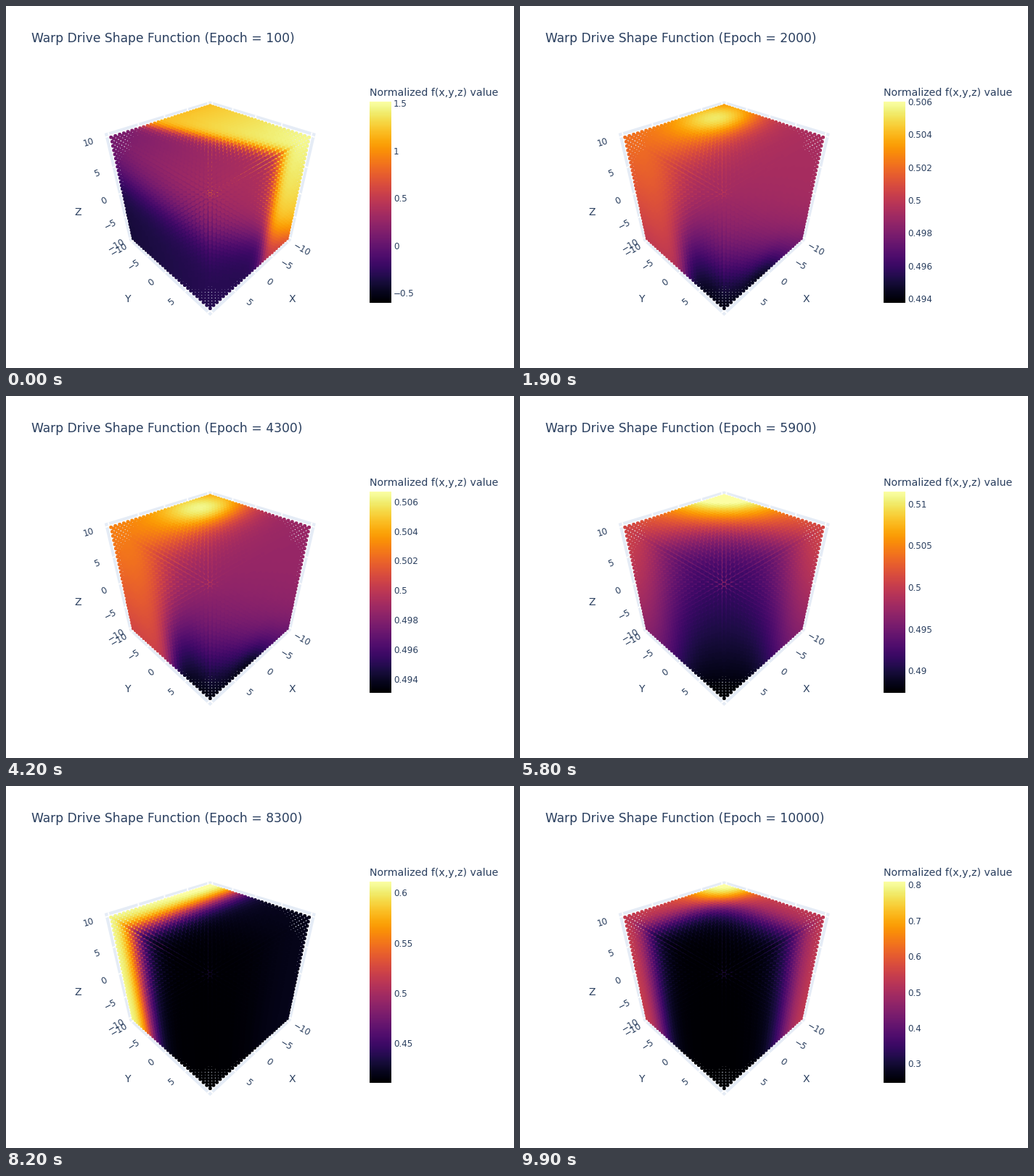
These frames come from a looping animation (700x500 px, 10000 ms). A matplotlib script:

```python
import matplotlib.pyplot as plt
import numpy as np
from matplotlib import colormaps
from matplotlib.animation import FuncAnimation

W, H, DPI = 700, 500, 100
FRAMES = 100
PT = 72 / DPI
INK, PANE = "#2a3f5f", "#e5ecf6"
plt.rcParams["font.family"] = "DejaVu Sans"

# Perspective camera on the (1, 1, 1) diagonal
CX, CY, FOCAL = 281.3, 260.0, 386.0
DIST = 1.25 * np.sqrt(3)
HALF, REACH = 0.5, 0.473     # half size of the box and of the point cloud


def project(x, y, z):
    depth = DIST - (x + y + z) / np.sqrt(3)
    px = CX + FOCAL * (y - x) / np.sqrt(2) / depth
    py = CY - FOCAL * (2 * z - x - y) / np.sqrt(6) / depth
    return px, py, depth


# Point cloud
N = 30
line = np.linspace(-1, 1, N)
X, Y, Z = (g.ravel() for g in np.meshgrid(line, line, line, indexing="ij"))


def rise(v, k):
    """Smooth step from 0 to 1 around v = 0, steeper for larger k."""
    return 1 / (1 + np.exp(-k * v))


def blob(x, y, z, size):
    r2 = (X - x) ** 2 + (Y - y) ** 2 + (Z - z) ** 2
    return np.exp(-r2 / (2 * size ** 2))


# Normalised fields of the training stages
def slanted_wall():
    floor = rise(Z + 0.27 - 0.02 * Y - 0.65 * X, 5)
    wall = rise(0.1 - X - 0.345 * Y - 0.06 * Z, 11)
    return 0.12 + 0.02 * Y + floor * (0.28 + 0.04 * Y) + wall * (0.45 + 0.07 * Z)


def warm_side(heat):
    cool = (1.05 - heat) * rise(Z + 0.77 - 0.67 * X, 2.5) - 0.07 * blob(0.1, 1, -1, 0.3)
    warm = heat + 0.08 * Z + 0.33 * blob(-0.45, -0.45, 1, 0.55)
    return cool + (warm - cool) * rise(0.15 * X - Y, 6 - 2 * Z)


def hot_corner():
    a, b = rise(-0.1 - X, 2.7), rise(-0.1 - Y, 2.7)
    return 0.04 + 0.44 * (a + b) + 0.09 * Z + 0.1 * a * b * (1 + Z)


def hot_face():
    return rise(-0.42 - Y, 6) + 0.05 * rise(-X, 3)


def hot_edge():
    return 0.53 * rise(-0.33 - X, 4.5) + 0.55 * rise(-0.45 - Y, 5.5)


# frame, colour range, field
KEYS = [
    (0, -0.600, 1.523, slanted_wall()),
    (9, 0.4940, 0.5057, warm_side(0.57)),
    (31, 0.4935, 0.5064, warm_side(0.63)),
    (42, 0.4931, 0.5067, warm_side(0.64)),
    (58, 0.4874, 0.5115, hot_corner()),
    (82, 0.4110, 0.6115, hot_face()),
    (99, 0.2474, 0.8100, hot_edge()),
]


def state(i):
    """Colour range and normalised field at one step."""
    k = max(j for j, key in enumerate(KEYS[:-1]) if key[0] <= i)
    (f0, lo0, hi0, n0), (f1, lo1, hi1, n1) = KEYS[k], KEYS[k + 1]
    u = (i - f0) / (f1 - f0)
    if k == 0:
        u = 1 - (1 - u) ** 2
    mid = (1 - u) * (lo0 + hi0) / 2 + u * (lo1 + hi1) / 2
    span = (hi0 - lo0) ** (1 - u) * (hi1 - lo1) ** u
    return mid - span / 2, mid + span / 2, np.clip((1 - u) * n0 + u * n1, 0, 1)


# Topmost point for every subpixel of the cube's window
SS, RADIUS = 3, 2.5
LEFT, TOP, BW, BH = 136, 130, 292, 296


def visible_points():
    px, py, depth = project(X * REACH, Y * REACH, Z * REACH)
    col = np.rint((px - LEFT) * SS).astype(int)
    row = np.rint((py - TOP) * SS).astype(int)
    r = int(RADIUS * SS) + 1
    dy, dx = np.mgrid[-r:r, -r:r]
    disc = np.hypot(dx + 0.5, dy + 0.5) <= RADIUS * SS
    stamp = (dy * BW * SS + dx)[disc]
    ids = np.full(BW * BH * SS * SS, len(X))
    for p in np.argsort(-depth, kind="stable"):
        ids[row[p] * BW * SS + col[p] + stamp] = p
    ids = ids.reshape(BH, SS, BW, SS).transpose(1, 3, 0, 2)
    return ids.reshape(SS * SS, BH, BW)


ids = visible_points()
cover = (ids < len(X)).sum(axis=0)
inferno = colormaps["inferno"](np.linspace(0, 1, 1024))[:, :3].astype("float32")
cloud = np.zeros((BH, BW, 4), "float32")
cloud[..., 3] = cover / SS ** 2


def paint(norm):
    colours = np.zeros((len(X) + 1, 3), "float32")
    colours[:-1] = inferno[(norm * 1023).astype(int)]
    total = sum(colours[layer] for layer in ids)
    cloud[..., :3] = total / np.maximum(cover, 1)[..., None]
    return np.clip(cloud, 0, 1)


# Stage
fig = plt.figure(figsize=(W / DPI, H / DPI), dpi=DPI, facecolor="white")
ax = fig.add_axes([0, 0, 1, 1])
ax.set_axis_off()


def label(x, y, text, size, **kw):
    return ax.text(x, y, text, fontsize=size * PT, color=INK, **kw)


def number(v):
    text = f"{v + 0.0:.6f}".rstrip("0").rstrip(".")
    return text.replace("-", "−")


def on_pane(axis, a, b):
    """Point (a, b) on the back pane where the given axis is lowest."""
    p = [a, b]
    p.insert(axis, -HALF)
    return project(*p)[:2]


square = [(-HALF, -HALF), (HALF, -HALF), (HALF, HALF), (-HALF, HALF)]
for axis in range(3):
    ax.fill(*zip(*(on_pane(axis, a, b) for a, b in square)), color=PANE, lw=0, zorder=1)
    for v in np.linspace(-REACH, REACH, 5):
        for ends in (((v, -HALF), (v, HALF)), ((-HALF, v), (HALF, v))):
            ax.plot(*zip(*(on_pane(axis, *e) for e in ends)), color="white",
                    lw=2 * PT, solid_capstyle="butt", zorder=2)

view = ax.imshow(cloud, extent=(LEFT, LEFT + BW, TOP + BH, TOP), aspect="auto",
                 interpolation="nearest", zorder=3)

# Axis labels, pushed outward from the box edge they belong to
EDGES = {
    "X": (5, lambda v, out: (v, HALF + out, -HALF)),
    "Y": (5, lambda v, out: (HALF + out, v, -HALF)),
    "Z": (10, lambda v, out: (HALF + out, -HALF, v)),
}
for name, (top, edge) in EDGES.items():
    for v in range(-10, top + 1, 5):
        x0, y0, _ = project(*edge(v / 10 * REACH, 0))
        x, y, _ = project(*edge(v / 10 * REACH, 0.12))
        angle = np.degrees(np.arctan((y0 - y) / (x - x0)))
        label(x, y, number(v), 12, rotation=angle, ha="center", va="center")
    x, y, _ = project(*edge(0, 0.32))
    label(x, y, name, 14, ha="center", va="center")

# Colour bar
BAR_L, BAR_R, BAR_T, BAR_B = 501, 531, 132, 410
ramp = inferno[np.linspace(1023, 0, BAR_B - BAR_T).astype(int)][:, None]
ax.imshow(ramp, extent=(BAR_L, BAR_R, BAR_B, BAR_T), aspect="auto",
          interpolation="nearest", zorder=3)
ax.set_xlim(0, W)
ax.set_ylim(H, 0)

title = label(35, 50, "", 17.1)
label(BAR_L, 124, "Normalized f(x,y,z) value", 14.1)
marks = [label(534, 0, "", 12) for _ in range(10)]


def tick_values(lo, hi):
    rough = (hi - lo) / ((BAR_B - BAR_T) / 40)
    base = 10 ** np.floor(np.log10(rough))
    step = next(m * base for m in (1, 2, 5, 10) if m * base >= rough)
    return np.arange(np.ceil(lo / step), np.floor(hi / step) + 1) * step


def update(i):
    lo, hi, norm = state(i)
    view.set_data(paint(norm))
    title.set_text(f"Warp Drive Shape Function (Epoch = {100 * (i + 1)})")
    for mark in marks:
        mark.set_text("")
    for mark, v in zip(marks, tick_values(lo, hi)):
        mark.set_text(number(v))
        mark.set_y(BAR_B - (v - lo) / (hi - lo) * (BAR_B - BAR_T) + 4.4)
    return [view, title, *marks]


anim = FuncAnimation(fig, update, frames=FRAMES, interval=100, repeat=True, blit=False)
plt.show()
```
